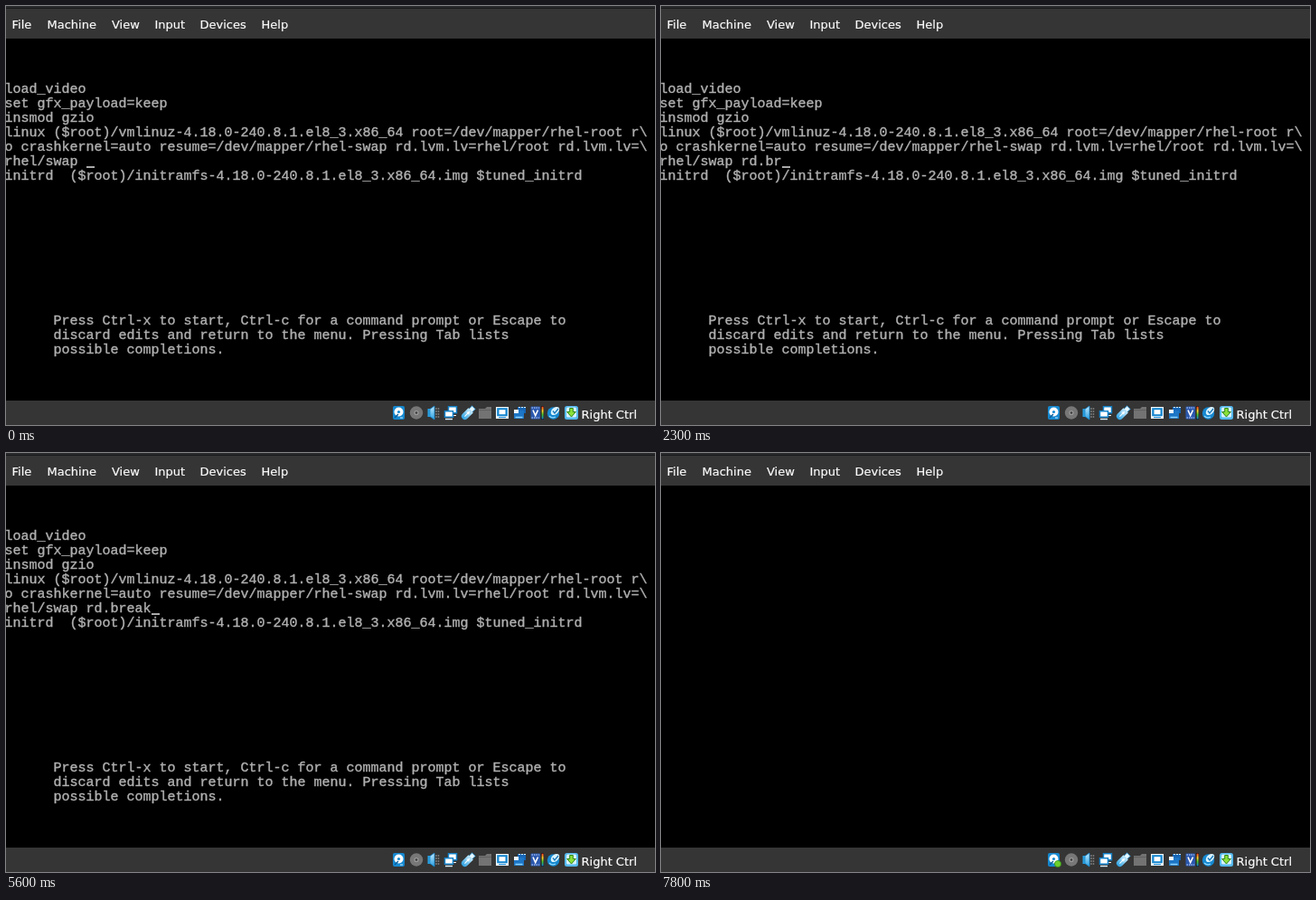
Recreate the animation shown at these times as an HTML page. Size 718x463 px, loop 8 s.

```html
<!DOCTYPE html>
<html lang="en">
<head>
<meta charset="utf-8">
<title>Boot entry editor</title>
<style>
  html, body { margin: 0; width: 100%; height: 100%; overflow: hidden; background: #000; }
  svg { display: block; width: 718px; height: 463px; }
  .ui { font: 13px "DejaVu Sans", sans-serif; fill: #fcfcfc; stroke: #fcfcfc; stroke-width: .2; }
  .term { font: 15px "Liberation Mono", monospace; fill: #b0b0b0; stroke: #b0b0b0; stroke-width: .4; white-space: pre; }
</style>
</head>
<body>
<svg viewBox="0 0 718 463" xmlns="http://www.w3.org/2000/svg">
  <defs>
    <linearGradient id="sky" x1="0" y1="0" x2="0" y2="1">
      <stop offset="0" stop-color="#c4ebff"/><stop offset="1" stop-color="#2a9fe0"/>
    </linearGradient>
    <linearGradient id="rainbow" x1="0" y1="0" x2="0" y2="1">
      <stop offset="0" stop-color="#f33b20"/><stop offset=".35" stop-color="#ffd42a"/>
      <stop offset=".65" stop-color="#48c832"/><stop offset="1" stop-color="#167bd8"/>
    </linearGradient>
  </defs>
  <rect width="718" height="463"/>
  <g id="screen"></g>
  <rect id="cursor" width="9" height="2" fill="#aaa"/>

  <rect width="718" height="36" fill="#353535"/>
  <rect width="718" height="2" fill="#292a2b"/>
  <rect y="2" width="718" height="1" fill="#18191a"/>
  <rect y="436" width="718" height="27" fill="#353535"/>
  <g id="menu" class="ui"></g>
  <text class="ui" x="636.5" y="456">Right Ctrl</text>

  <g id="icons">
    <g><!-- hard disk -->
      <rect x="1" y="0" width="13" height="15" rx="2" fill="#1689d0"/>
      <circle cx="7.5" cy="6.5" r="5" fill="#fff"/>
      <circle cx="7.5" cy="6.5" r="1.6" fill="#1689d0"/>
      <path d="M3 13 7 9" stroke="#0b5c99" stroke-width="1.4"/>
      <path d="M9 13h3" stroke="#c8ecff"/>
      <circle id="busy" cx="12" cy="12" r="3.6" fill="#6ed02e" stroke="#2f8a14" stroke-width=".7"/>
    </g>
    <g><!-- optical disc -->
      <circle cx="8" cy="7.5" r="7.2" fill="#777"/>
      <circle cx="8" cy="7.5" r="2.6" fill="#999"/>
      <circle cx="8" cy="7.5" r="1.3" fill="#3b3b3b"/>
    </g>
    <g><!-- audio -->
      <rect x="1.5" y="3" width="4" height="9" fill="#2a9fe0"/>
      <path d="M4 3.5 9 0v15L4 11.5z" fill="url(#sky)" stroke="#1689d0" stroke-width=".8"/>
      <path d="M11 2v12M13.5 2v12" stroke="#777" stroke-width="1.5" stroke-dasharray="2 1"/>
    </g>
    <g stroke="#1481c8"><!-- network -->
      <rect x="5.5" y=".7" width="9" height="7" fill="#fff" stroke-width="1.5"/>
      <path d="M9 10.5h5" stroke="#fff"/>
      <rect x="1.5" y="5.7" width="9" height="6.5" fill="#fff" stroke-width="1.5"/>
      <path d="M2 14.5h8" stroke="#dff4ff" stroke-width="1.4"/>
    </g>
    <g transform="rotate(45 8 8)"><!-- usb stick -->
      <rect x="5.5" y="-1" width="5" height="5" fill="#e8f8ff" stroke="#1689d0" stroke-width=".8"/>
      <path d="M4.2 3.5h7.6v9q0 4-3.8 4t-3.8-4z" fill="url(#sky)"/>
      <path d="M8 6v7M6.5 8.5 8 6l1.5 2.5" fill="none" stroke="#fff"/>
    </g>
    <g><!-- shared folder -->
      <path d="M1 3h7l2-2h5v13H1z" fill="#737373"/>
      <path d="M1 4.5h14" stroke="#606060"/>
    </g>
    <g><!-- display -->
      <rect x="1" y="1" width="14" height="13" fill="#f4fbff"/>
      <rect x="2.2" y="2.2" width="11.6" height="9" fill="#1585cf"/>
      <rect x="4.5" y="4.2" width="7" height="5" fill="#fff"/>
      <path d="M4 12.6h8" stroke="#1585cf"/>
    </g>
    <g><!-- recording -->
      <rect x="6" y="1" width="9" height="7" fill="#1766b5"/>
      <path d="M7 1.5h2m1 0h2m1 0h2" stroke="#d9f2ff"/>
      <rect x="2" y="5" width="11" height="9" fill="#1d76c6"/>
      <rect x="2" y="4" width="5" height="4" fill="#eef9ff"/>
      <path d="M3.5 12.5h8" stroke="#8bd2ff" stroke-width="1.5"/>
    </g>
    <g><!-- processor -->
      <rect x="1.5" y=".5" width="10.5" height="14" rx="1" fill="#2b58ae"/>
      <path d="M2.5 2h8.5M2.5 13h8.5" stroke="#c9dcff" stroke-dasharray="1.5 1"/>
      <path d="M4 4.5 6.7 10.5 9.5 4.5" fill="none" stroke="#fff" stroke-width="1.6"/>
      <rect x="13" y="0" width="3" height="15" fill="#111"/>
      <rect x="13.6" y=".6" width="2" height="13.8" fill="url(#rainbow)"/>
    </g>
    <g><!-- mouse -->
      <circle cx="7.5" cy="8" r="6.7" fill="#1689d0"/>
      <ellipse cx="9.5" cy="5.5" rx="5.5" ry="3.6" transform="rotate(-42 9.5 5.5)" fill="#d9f3ff"/>
      <path d="M7 5.5 9 8l4-5" fill="none" stroke="#1476b9" stroke-width="1.3"/>
      <path d="M3 11q3 3 7 1" fill="none" stroke="#8fd8ff" stroke-width="1.2"/>
    </g>
    <g><!-- keyboard -->
      <rect x="1" y="0" width="15" height="15" rx="2.5" fill="#55b9ed"/>
      <rect x="3" y="1.5" width="11" height="11" rx="1.5" fill="#d7f2ff"/>
      <path d="M6.7 2.5h3.6v4h3L8.5 12 3.7 6.5h3z" fill="#8be03a" stroke="#2f8516"/>
    </g>
  </g>
</svg>
<script>
const LOOP = 8000, CELL_W = 9, CELL_H = 16, LEFT = -1, TOP = 36;
const CLEAR_AT = 7000, BUSY_AT = 7100;
const EDIT_ROW = 8, EDIT_TEXT = "rhel/swap ", TYPED = "rd.break";
const keys = [1100, 1300, 1600, 2000, 2200, 3500, 3700, 3900];
const blinks = [100, 300, 500, 700, 1000, 1200, 1400, 1900, 2100, 2300,
  3100, 3200, 3400, 3600, 3800, 4000, 4200, 4500];
for (let t = 4600; t <= 7800; t += 200) blinks.push(t);

const lines = [
  [3, 0, "load_video"],
  [4, 0, "set gfx_payload=keep"],
  [5, 0, "insmod gzio"],
  [6, 0, "linux ($root)/vmlinuz-4.18.0-240.8.1.el8_3.x86_64 root=/dev/mapper/rhel-root r\\"],
  [7, 0, "o crashkernel=auto resume=/dev/mapper/rhel-swap rd.lvm.lv=rhel/root rd.lvm.lv=\\"],
  [EDIT_ROW, 0, EDIT_TEXT],
  [9, 0, "initrd  ($root)/initramfs-4.18.0-240.8.1.el8_3.x86_64.img $tuned_initrd"],
  [19, 6, "Press Ctrl-x to start, Ctrl-c for a command prompt or Escape to"],
  [20, 6, "discard edits and return to the menu. Pressing Tab lists"],
  [21, 6, "possible completions."]
];
const menu = [["File", 6.5], ["Machine", 45.5], ["View", 117], ["Input", 164.5], ["Devices", 214.5], ["Help", 282.5]];

const $ = id => document.getElementById(id);
const colX = col => LEFT + col * CELL_W;
const rowY = row => TOP + row * CELL_H;

function addText(parent, x, y, text, cls) {
  const el = document.createElementNS("http://www.w3.org/2000/svg", "text");
  el.setAttribute("x", x);
  el.setAttribute("y", y);
  if (cls) el.setAttribute("class", cls);
  el.textContent = text;
  return parent.appendChild(el);
}

const rows = lines.map(([row, col, text]) => addText($("screen"), colX(col) - .5, rowY(row) + 12, text, "term"));
const editLine = rows[lines.findIndex(line => line[0] === EDIT_ROW)];
menu.forEach(([label, x]) => addText($("menu"), x, 25, label));

// Wrap each icon so its own transform stays intact.
[...$("icons").children].forEach((icon, i) => {
  const slot = document.createElementNS(icon.namespaceURI, "g");
  slot.setAttribute("transform", `translate(${427 + 19 * i} 442)`);
  icon.replaceWith(slot);
  slot.append(icon);
});

const passed = (times, t) => times.filter(at => at <= t).length;
const show = (el, on) => el.setAttribute("visibility", on ? "visible" : "hidden");

function draw(t) {
  const cleared = t >= CLEAR_AT;
  const count = passed(keys, t);
  editLine.textContent = EDIT_TEXT + TYPED.slice(0, count);
  show($("screen"), !cleared);
  show($("busy"), t >= BUSY_AT);

  const cursor = $("cursor");
  cursor.setAttribute("x", colX(cleared ? 0 : EDIT_TEXT.length + count));
  cursor.setAttribute("y", rowY(cleared ? 0 : EDIT_ROW) + 13);
  show(cursor, passed(blinks, t) % 2 === 0);
}

const start = performance.now();
function tick() {
  draw((performance.now() - start) % LOOP);
  requestAnimationFrame(tick);
}
tick();
</script>
</body>
</html>
```
